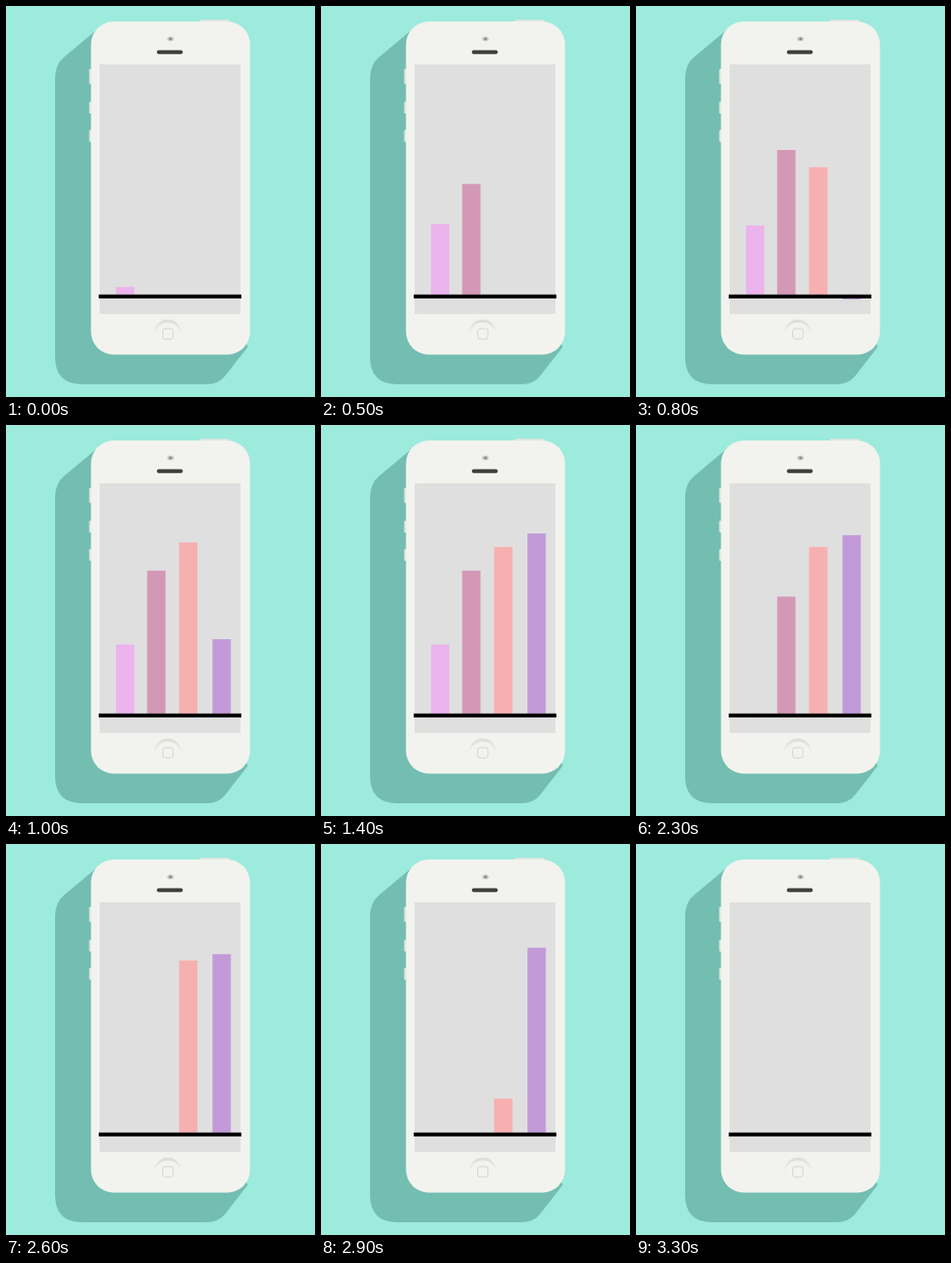
Recreate the animation shown at these times as an HTML page. Size 340 by 429 pixels, loop 3400 ms.

```html
<!DOCTYPE html>
<html lang="en">
<head>
<meta charset="utf-8">
<title>Phone bar chart</title>
<style>
  html, body { margin: 0; width: 100%; height: 100%; overflow: hidden; background: #9cebdd; }
  svg { display: block; width: 340px; height: 429px; }
</style>
</head>
<body>
<svg viewBox="0 0 340 429">
  <defs>
    <linearGradient id="dish" x1="0" y1="0" x2="0" y2="1">
      <stop offset="0" stop-color="#dcddd7"/>
      <stop offset=".22" stop-color="#e3e4de"/>
      <stop offset=".5" stop-color="#f1f2ed"/>
    </linearGradient>
  </defs>
  <rect width="340" height="429" fill="#9cebdd"/>
  <path fill="#74bdb1" d="M100 26L64 56Q54 64 54 80V385Q54 415 84 415H220Q234 415 241 406L266 374Z"/>
  <g fill="#dfe6df">
    <rect x="213" y="15" width="33" height="5" rx="2"/>
    <rect x="91.5" y="69" width="4" height="16.5" rx="1"/>
    <rect x="91.5" y="105" width="4" height="13" rx="1"/>
    <rect x="91.5" y="136" width="4" height="13" rx="1"/>
  </g>
  <rect x="93.5" y="17" width="175" height="365.5" rx="25" fill="#f2f3ee"/>
  <ellipse cx="181" cy="36" rx="3.6" ry="2.6" fill="#c6c7c3"/>
  <circle cx="181" cy="36.2" r="1.4" fill="#85867f"/>
  <rect x="166" y="48.5" width="28.5" height="4.3" rx="2" fill="#3f3d39"/>
  <rect x="103" y="64" width="155" height="274" fill="#dfdfdf"/>
  <g id="bars"></g>
  <rect x="102" y="316.6" width="157" height="4.2" fill="#000"/>
  <circle cx="178" cy="359" r="15" fill="url(#dish)"/>
  <circle cx="178" cy="361.5" r="14.2" fill="#f2f3ee"/>
  <rect x="172.5" y="354" width="11.3" height="11.3" rx="2.5" fill="none" stroke="#d3d4ce"/>
</svg>
<script>
const LOOP = 3400, STEP = 100, SETTLE = 300, BASE = 316.8;

// rise, fall: [start, end] in ms; low: height before rising and after falling
const bars = [
  { x: 121,   color: '#ebb4ec', rest: 76,  peak: 82,  low: 0,  rise: [-75, 300],  fall: [1910, 2310] },
  { x: 155.3, color: '#d498b7', rest: 157, peak: 164, low: 0,  rise: [300, 600],  fall: [2200, 2533] },
  { x: 190.5, color: '#f7b0b0', rest: 183, peak: 189, low: 0,  rise: [560, 920],  fall: [2600, 3020] },
  { x: 227.2, color: '#c39ad8', rest: 196, peak: 203, low: -5, rise: [840, 1200], fall: [2900, 3200] }
];

const group = document.getElementById('bars');
for (const bar of bars) {
  bar.node = document.createElementNS('http://www.w3.org/2000/svg', 'rect');
  bar.node.setAttribute('x', bar.x);
  bar.node.setAttribute('width', 20.2);
  bar.node.setAttribute('fill', bar.color);
  group.append(bar.node);
}

function ease(t, start, end) {
  const p = Math.min(1, Math.max(0, (t - start) / (end - start)));
  return p * p * (3 - 2 * p);
}

function heightAt({ rest, peak, low, rise, fall }, t) {
  if (t < rise[0] - 50 || t > fall[1] + 50) return 0;
  return low
    + (peak - low) * ease(t, ...rise)
    - (peak - rest) * ease(t, rise[1], rise[1] + SETTLE)
    + (peak - rest) * ease(t, fall[0] - SETTLE, fall[0])
    - (peak - low) * ease(t, ...fall);
}

function draw(t) {
  for (const bar of bars) {
    const h = heightAt(bar, t);
    bar.node.setAttribute('y', BASE - Math.max(h, 0));
    bar.node.setAttribute('height', Math.abs(h));
  }
}

let origin;
function tick(now) {
  origin ??= now;
  draw(Math.floor(((now - origin) % LOOP) / STEP) * STEP);
  requestAnimationFrame(tick);
}
draw(0);
requestAnimationFrame(tick);
</script>
</body>
</html>
```
